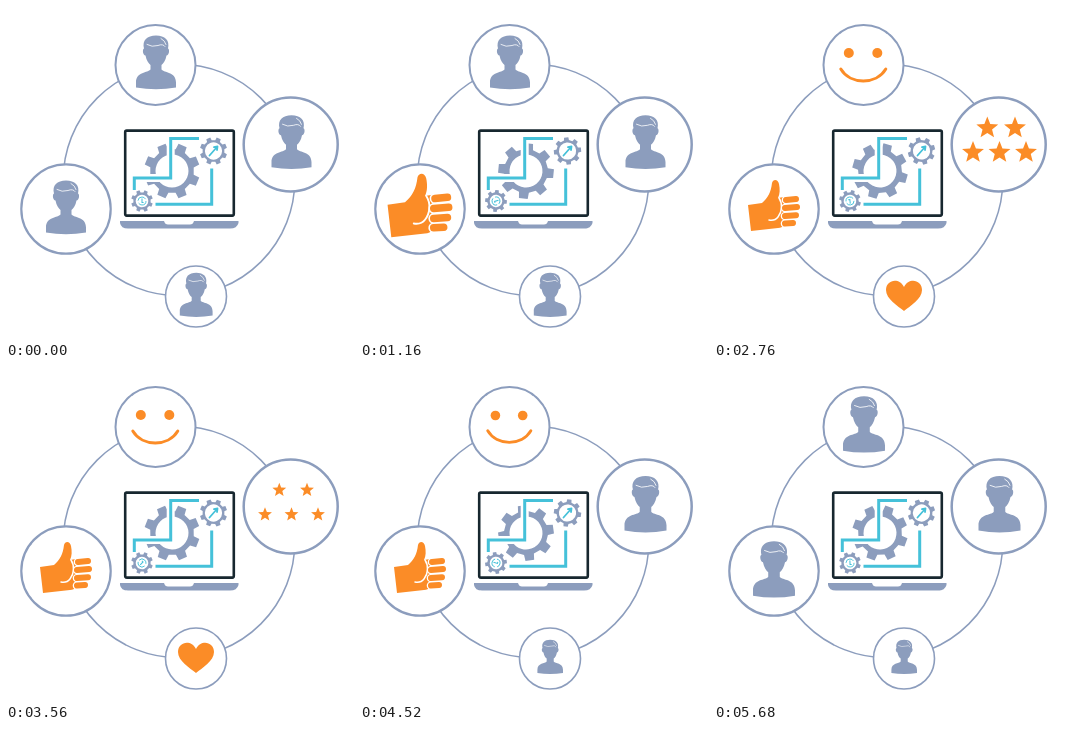
An HTML page that plays this animation: 348 by 334 pixels, repeating every 5720 ms.

```html
<!DOCTYPE html>
<html lang="en">
<head>
<meta charset="utf-8">
<title>Feedback loop</title>
<style>
  html, body { margin: 0; width: 100%; height: 100%; overflow: hidden; background: #fff; }
  svg { display: block; width: 348px; height: 334px; }
  .line { fill: none; stroke-linecap: round; stroke-linejoin: round; }
</style>
</head>
<body>
<svg viewBox="0 0 348 334">
  <defs>
    <g id="person">
      <path fill="#8c9dbd" d="M-12-14C-14-22-9-27 0-27C9-27 14-22 12-14C14-13 13-7 10.5-7C9.5-2 7.5 1 5.5 2.5V7C8 10.5 20 9 20 20V25Q0 28.5-20 25V20C-20 9-8 10.5-5.5 7V2.5C-7.5 1-9.5-2-10.5-7C-13-7-14-13-12-14Z"/>
      <path class="line" stroke="#fff" stroke-width=".8" d="M-9-18Q-4-15 2-17Q7-19 9-16M5-24Q9-22 10-18"/>
    </g>
    <g id="thumb" fill="#fb8c27">
      <path d="M-26-1L-12-3C-6-8-3-14-2-23C-1-27 4-27 5-22C6-17 6-12 4-8L10-9V19Q8 22 4 22L-23 25Z"/>
      <path id="fingers" class="line" stroke="#fff" stroke-width="8.6" d="M12-6L22-7M11 2L23 1M11 10L22 9.3M11 17.5L19 17"/>
      <path class="line" stroke="#fff" stroke-width="1.5" d="M5-8C9-2 8 6 4 11Q1 15-5 14"/>
      <path class="line" stroke="#fb8c27" stroke-width="6" d="M12-6L22-7M11 2L23 1M11 10L22 9.3M11 17.5L19 17"/>
    </g>
    <g id="smile" fill="#fb8c27">
      <circle cx="-14.5" cy="-12" r="5"/><circle cx="14" cy="-12" r="5"/>
      <path class="line" stroke="#fb8c27" stroke-width="3" d="M-22.5 4C-13 20 13 20 22.5 4"/>
    </g>
    <path id="heart" fill="#fb8c27" d="M0 15C-6 10-18 3-18-6C-18-16-5-19 0-9C5-19 18-16 18-6C18 3 6 10 0 15Z"/>
    <path id="star" fill="#fb8c27"/>
  </defs>

  <g fill="#fff" stroke="#8c9dbd">
    <circle cx="173" cy="174" r="115.8" stroke-width="1.5"/>
    <circle cx="149.5" cy="59" r="40" stroke-width="2"/>
    <circle cx="284.7" cy="138.5" r="47" stroke-width="2.5"/>
    <circle cx="60" cy="203" r="44.7" stroke-width="2.2"/>
    <circle cx="190" cy="290.5" r="30.5" stroke-width="1.6"/>
  </g>

  <rect x="119.2" y="124.6" width="108.6" height="85" rx="1.5" fill="#fff" stroke="#17272f" stroke-width="2.6"/>
  <path fill="#8c9dbd" d="M114 215H158Q159 218.5 162 218.5H184Q187 218.5 188 215H232.500V217Q231 222.500 224 222.500H122Q115 222.500 114 217Z"/>

  <g id="gears" fill="#8c9dbd" fill-rule="evenodd"></g>
  <g fill="none">
    <path stroke="#fff" stroke-width="8" d="M128.300 184V172H164.700V132.400H193"/>
    <path stroke="#45c1d9" stroke-width="3" d="M128.300 184V172H164.700V132.400H193M149.500 198.300H205.700V162.500"/>
    <path class="line" stroke="#45c1d9" stroke-width="1.8" d="M203.500 149.500L211 141M208 141.200L211.500 140.500L211 144"/>
    <g id="dial" stroke="#45c1d9">
      <circle r="4" stroke-width=".9" stroke-dasharray="10 2.566"/>
      <path stroke-width="1" d="M0-2.600V1.500H1.600"/>
    </g>
  </g>
  <g id="icons"></g>
</svg>
<script>
const LOOP = 5720;
const $ = id => document.getElementById(id);
const clamp = x => Math.min(1, Math.max(0, x));
const mix = (a, b, p) => a + (b - a) * p;
const polar = (r, a) => (r * Math.cos(a)).toFixed(2) + ' ' + (r * Math.sin(a)).toFixed(2);

function add(parent, tag, attrs) {
  const el = document.createElementNS('http://www.w3.org/2000/svg', tag);
  for (const k in attrs) el.setAttribute(k, attrs[k]);
  return $(parent).appendChild(el);
}

function gearPath(outer, root, hole) {
  const pts = [], step = Math.PI / 4;
  for (let i = 0; i < 8; i++)
    for (const [r, o] of [[root, -.29], [outer, -.2], [outer, .2], [root, .29]])
      pts.push(polar(r, (i + o) * step));
  return `M${pts.join('L')}ZM${hole} 0A${hole} ${hole} 0 1 0 ${-hole} 0A${hole} ${hole} 0 1 0 ${hole} 0Z`;
}

$('star').setAttribute('d', 'M' + Array.from({ length: 10 },
  (_, i) => polar(i % 2 ? 5 : 11.5, (i / 5 - .5) * Math.PI)).join('L') + 'Z');

// x, y, outer, root and hole radius, turns per loop
const gears = [
  [166, 165, 28, 22, 16.5, 1],
  [207.5, 145, 13.8, 11, 8.6, -1],
  [136, 195, 11, 8.7, 6.3, 1]
].map(([x, y, outer, root, hole, turns]) =>
  ({ x, y, turns, el: add('gears', 'path', { d: gearPath(outer, root, hole) }) }));

const shrink = (t, end) => 1 - clamp((t - end + 200) / 200) ** 2;

function pop(t, start, peak, rest) {
  if (t < start) return 0;
  if (t < start + 160) return peak * Math.sin((t - start) / 160 * Math.PI / 2);
  return mix(peak, rest, clamp((t - start - 160) / 120));
}

const icons = [];
const icon = (id, x, y, scale) =>
  icons.push({ x, y, scale, el: add('icons', 'use', { href: '#' + id }) });

function person(x, y, size, end, leave, back) {
  icon('person', x, y, t => size * (t < leave ? shrink(t, leave) : pop(t, back, 1.25 * end / 1.05, end)));
}
person(60, 201.5, 1, 1.05, 1000, 5200);
person(150, 56.5, 1, 1.05, 1640, 4680);
person(190.2, 289, .82, .78, 1720, 4160);
person(285.5, 136.3, 1, 1.05, 2400, 3640);

function mood(id, x, y, peak, start, leave) {
  icon(id, x, y, t => pop(t, start, peak, 1) * shrink(t, leave));
}
mood('thumb', 60, 200, 1.25, 1000, 5200);
mood('smile', 149.3, 59, 1.22, 1640, 4680);
mood('heart', 190, 290, 1.4, 1720, 4160);
for (const [x, y] of [[273.3, 122], [301, 122], [259, 146.5], [285.5, 146.5], [312, 146.5]])
  mood('star', x, y, 1, 2400, 3640);

function draw(now) {
  const t = now % LOOP, turn = 360 * t / LOOP;
  for (const g of gears)
    g.el.setAttribute('transform', `translate(${g.x} ${g.y}) rotate(${22.5 + turn * g.turns})`);
  $('dial').setAttribute('transform', `translate(136 195) rotate(${turn})`);
  for (const i of icons)
    i.el.setAttribute('transform', `translate(${i.x} ${i.y}) scale(${i.scale(t)})`);
  requestAnimationFrame(draw);
}
draw(0);
</script>
</body>
</html>
```
